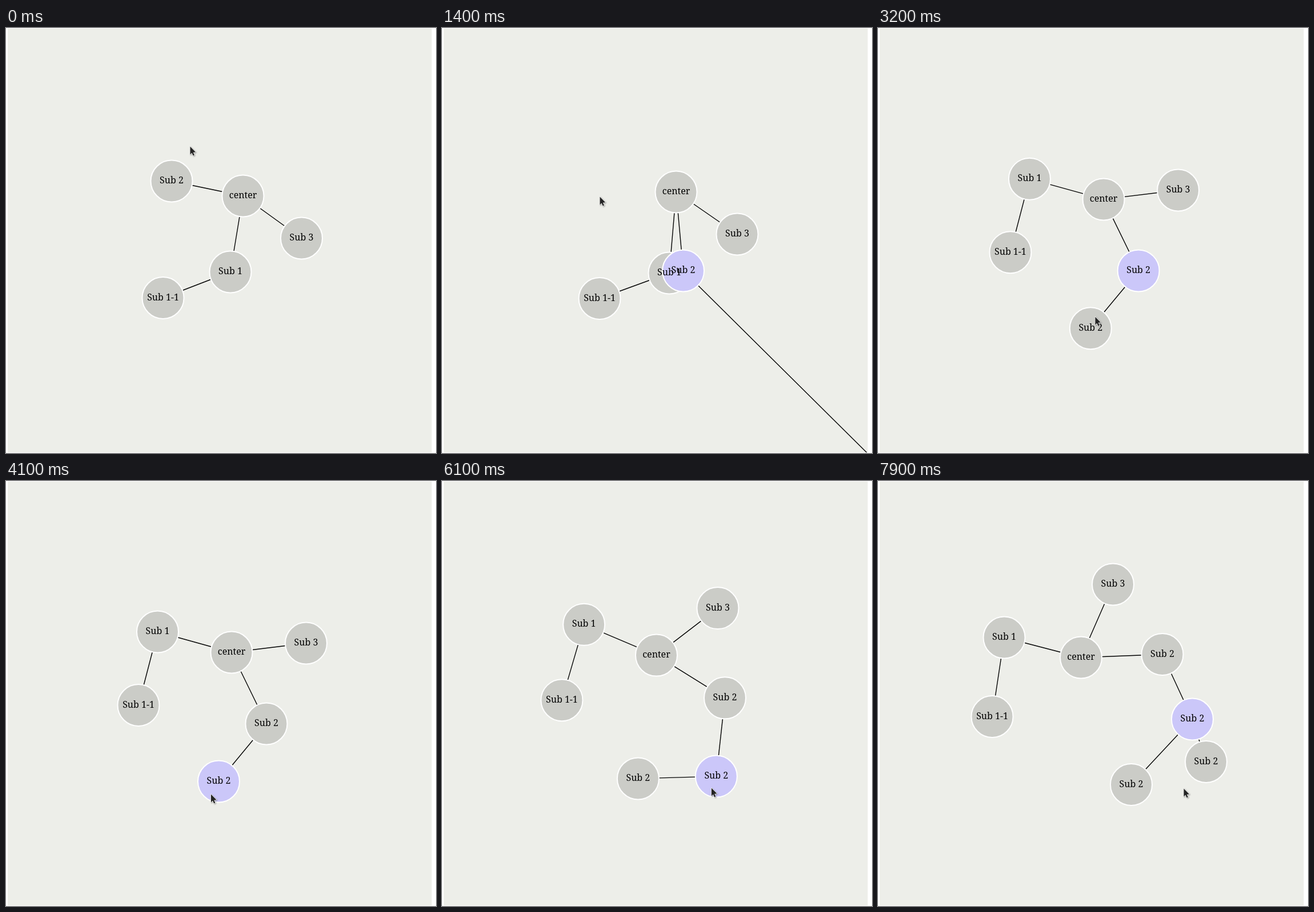
An HTML page with a canvas for the animation above (8000 ms loop, 753 by 744 pixels).

```html
<!DOCTYPE html>
<html lang="en">
<head>
<meta charset="utf-8">
<title>Node graph</title>
<style>
  html, body { margin: 0; width: 100%; height: 100%; overflow: hidden; background: #fff; }
  canvas { display: block; }
</style>
</head>
<body>
<canvas id="stage" width="753" height="744"></canvas>
<script>
const ctx = document.getElementById("stage").getContext("2d");
const LOOP = 8000, STEP = 100, RADIUS = 36.5;

// New nodes fly in from an entry point at their birth time.
const nodes = [
  { label: "center" },
  { label: "Sub 1", parent: 0 },
  { label: "Sub 2", parent: 0 },
  { label: "Sub 3", parent: 0 },
  { label: "Sub 1-1", parent: 1 },
  { label: "Sub 2", parent: 2, born: 1400, entry: [900, 898] },
  { label: "Sub 2", parent: 5, born: 4300, entry: [604, 701] },
  { label: "Sub 2", parent: 5, born: 6500, entry: [551, 570] }
];

const easeOut = p => u => 1 - (1 - u) ** p;
const easeIn = p => u => u ** p;

// Layout poses, node by node; ease leads into the pose, leap names a node that snaps there.
const poses = [
  { at: 0, mouse: [322, 207],
    pts: [[415, 294], [393, 427], [290, 268], [517.5, 368], [275, 472.5]] },
  { at: 1400, mouse: [276, 295], ease: easeIn(1), leap: 2,
    pts: [[410, 287], [398, 429], [422.5, 425], [517, 361], [276, 473.5]] },
  { at: 2200, mouse: [405, 455], ease: easeOut(6),
    pts: [[399, 291.5], [261.5, 278], [468.5, 422], [534.5, 286], [222.5, 411], [356.5, 500]] },
  { at: 4100, mouse: [358.5, 548], ease: easeOut(6),
    pts: [[395, 300], [265.5, 264], [456, 425], [525.5, 284], [232, 392.5], [372.5, 526]] },
  { at: 5100, mouse: [463.5, 532], ease: easeOut(1.5),
    pts: [[375.5, 305.5], [249, 251], [494, 382.5], [485.5, 226], [211.5, 384], [477, 519.5],
      [340, 525]] },
  { at: 6800, mouse: [476, 540], ease: easeIn(5),
    pts: [[375, 300], [244, 256], [511, 342.5], [442.5, 185.5], [190, 378.5], [520, 480.5],
      [385.5, 462], [421, 571]] },
  { at: 7900, mouse: [535, 538], ease: easeIn(1.5),
    pts: [[355.5, 309], [221, 274], [498, 303.5], [411.5, 181], [200, 412.5], [550.5, 417],
      [443.5, 531.5], [574.5, 491.5]] }
];

const arrow = [[0, 0], [0, 14], [3, 11], [5.2, 16], [7.4, 15], [5.3, 10.2], [9.6, 9.8]];

const lerp = (a, b, u) => a + (b - a) * u;
const mix = (p, q, u) => [lerp(p[0], q[0], u), lerp(p[1], q[1], u)];

// Turns and stretches the link vector p into q the short way round.
function swing(p, q, u) {
  const a = Math.atan2(p[1], p[0]), b = Math.atan2(q[1], q[0]);
  const turn = Math.atan2(Math.sin(b - a), Math.cos(b - a));
  const len = lerp(Math.hypot(...p), Math.hypot(...q), u);
  return [len * Math.cos(a + turn * u), len * Math.sin(a + turn * u)];
}

function link(pose, i) {
  const p = pose.pts[i], q = pose.pts[nodes[i].parent];
  return [p[0] - q[0], p[1] - q[1]];
}

function layout(t, from, to, u) {
  const places = [];
  nodes.forEach((n, i) => {
    if (t < n.born || !to.pts[i]) return;
    if (i === 0) {
      places.push(mix(from.pts[0], to.pts[0], u));
      return;
    }
    const end = link(to, i);
    const start = from.pts[i] ? link(from, i) : end;
    const v = swing(start, end, to.leap === i ? 0 : u);
    const base = places[n.parent];
    const p = [base[0] + v[0], base[1] + v[1]];
    places.push(n.entry ? mix(p, n.entry, Math.exp((n.born - t) / 60)) : p);
  });
  return places;
}

function selected(t) {
  return t < 1000 ? -1 : t < 3800 ? 2 : 5;
}

function drawPointer([x, y]) {
  ctx.save();
  ctx.translate(x + 0.5, y + 0.5);
  ctx.beginPath();
  arrow.forEach(p => ctx.lineTo(...p));
  ctx.closePath();
  ctx.lineJoin = "round";
  ctx.shadowColor = "rgba(0,0,0,0.35)";
  ctx.shadowBlur = 2;
  ctx.shadowOffsetX = ctx.shadowOffsetY = 1;
  ctx.strokeStyle = "#f4f4f2";
  ctx.lineWidth = 1.5;
  ctx.stroke();
  ctx.shadowColor = "transparent";
  ctx.fillStyle = "#242424";
  ctx.fill();
  ctx.restore();
}

function draw(t) {
  const k = Math.min(poses.filter(p => p.at <= t).length, poses.length - 1);
  const from = poses[k - 1], to = poses[k];
  const u = (t - from.at) / (to.at - from.at);
  const places = layout(t, from, to, to.ease(u));
  const pick = selected(t);

  ctx.fillStyle = "#fff";
  ctx.fillRect(0, 0, 753, 744);
  ctx.save();
  ctx.beginPath();
  ctx.rect(3, 1, 742.5, 742);
  ctx.clip();
  ctx.fillStyle = "#edeee9";
  ctx.fillRect(3, 1, 743, 742);

  ctx.strokeStyle = "#000";
  ctx.lineWidth = 1.4;
  places.slice(1).forEach((p, i) => {
    ctx.beginPath();
    ctx.moveTo(...places[nodes[i + 1].parent]);
    ctx.lineTo(...p);
    ctx.stroke();
  });

  ctx.strokeStyle = "#fff";
  ctx.lineWidth = 2;
  places.forEach(([x, y], i) => {
    ctx.beginPath();
    ctx.arc(x, y, RADIUS, 0, Math.PI * 2);
    ctx.fillStyle = i === pick ? "#cbc7f9" : "#cbccc7";
    ctx.fill();
    ctx.stroke();
  });

  ctx.fillStyle = "#000";
  ctx.font = '16px "Noto Serif", serif';
  ctx.textAlign = "center";
  places.forEach(([x, y], i) => ctx.fillText(nodes[i].label, x, y + 4));

  drawPointer(mix(from.mouse, to.mouse, u * u * (3 - 2 * u)));
  ctx.restore();
}

const start = performance.now();
function tick() {
  const t = (performance.now() - start) % LOOP;
  draw(Math.floor(t / STEP) * STEP);
  requestAnimationFrame(tick);
}
tick();
</script>
</body>
</html>
```
